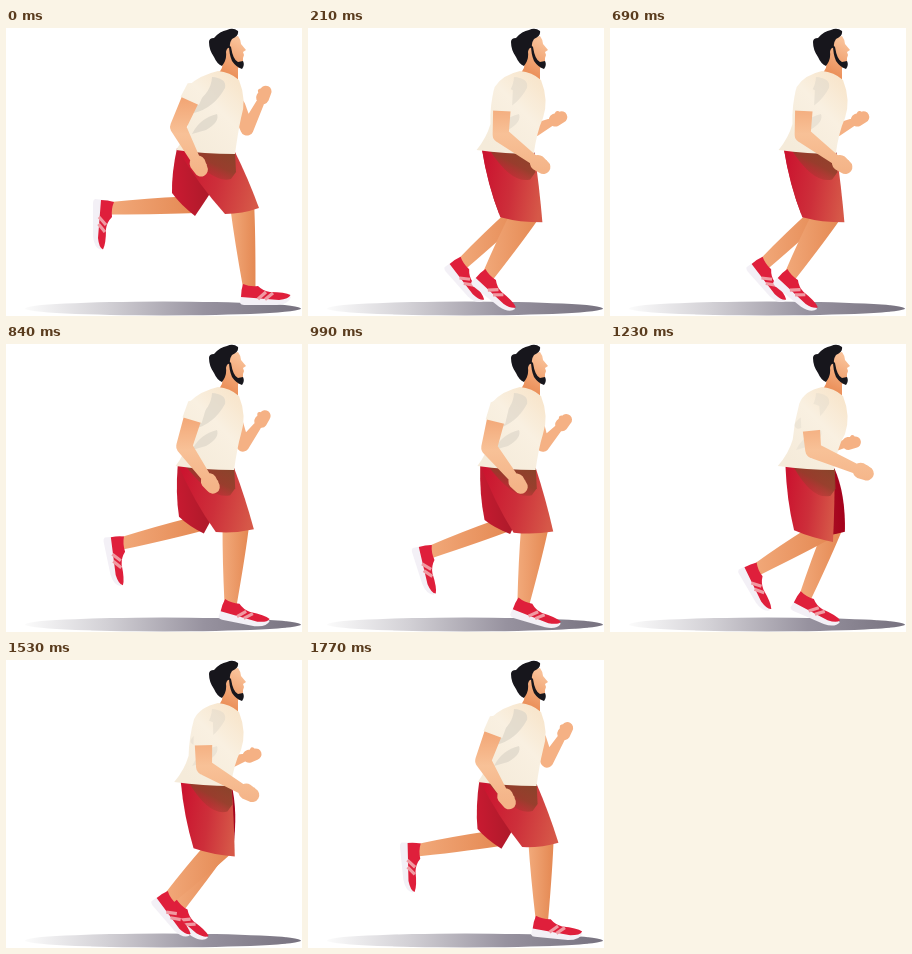
An HTML page for the animation above (1.8 s loop, 296x288 px).

```html
<!DOCTYPE html>
<html lang="en">
<head>
<meta charset="utf-8">
<title>Runner</title>
<style>
  html, body { margin: 0; width: 100%; height: 100%; overflow: hidden; background: #fff; }
  svg { display: block; width: 100vw; height: 100vh; }
</style>
</head>
<body>
<svg viewBox="0 0 296 288" xmlns="http://www.w3.org/2000/svg">
  <defs>
    <linearGradient id="ground">
      <stop offset="0" stop-color="#fbfbfb"/><stop offset=".3" stop-color="#d2d0d5"/>
      <stop offset=".65" stop-color="#97929f"/><stop offset="1" stop-color="#77727f"/>
    </linearGradient>
    <linearGradient id="shirt" gradientUnits="userSpaceOnUse" x1="180" y1="115" x2="236" y2="60">
      <stop offset="0" stop-color="#f5ebda"/><stop offset=".6" stop-color="#f9f0e1"/><stop offset="1" stop-color="#f8e6cd"/>
    </linearGradient>
    <linearGradient id="nearRed" x1="0" y1=".4" x2="1" y2=".6">
      <stop offset="0" stop-color="#cb142f"/><stop offset=".5" stop-color="#cd2f3a"/><stop offset="1" stop-color="#d65848"/>
    </linearGradient>
    <linearGradient id="brown" x1="1" y1="0" x2=".2" y2="1">
      <stop offset="0" stop-color="#86452a"/><stop offset=".5" stop-color="#8f3f2a" stop-opacity=".85"/>
      <stop offset="1" stop-color="#b02a30" stop-opacity="0"/>
    </linearGradient>
    <linearGradient id="farRed" gradientUnits="userSpaceOnUse" x1="170" y1="165" x2="235" y2="160">
      <stop offset="0" stop-color="#c81a31"/><stop offset=".5" stop-color="#ae1a2a"/><stop offset="1" stop-color="#a4001b"/>
    </linearGradient>
    <linearGradient id="leg">
      <stop offset="0" stop-color="#f2aa7b"/><stop offset="1" stop-color="#e48852"/>
    </linearGradient>
    <linearGradient id="arm" gradientUnits="userSpaceOnUse" x1="0" y1="70" x2="0" y2="142">
      <stop offset="0" stop-color="#f2a574"/><stop offset=".5" stop-color="#f8c197"/><stop offset="1" stop-color="#f4b488"/>
    </linearGradient>
    <linearGradient id="face" gradientUnits="userSpaceOnUse" x1="220" y1="48" x2="236" y2="14">
      <stop offset="0" stop-color="#ea8c55"/><stop offset="1" stop-color="#f9c198"/>
    </linearGradient>
    <g id="shoe">
      <path fill="#f3f0f6" d="M-8 7 L-9 16 Q-8 18 -5 18 L28 18 Q40 17 42 10 L38 8Z"/>
      <path fill="#df1f3b" d="M-6 -3 Q1 0 9 -1 Q14 4 21 5 Q36 5 41.500 8 Q40 12 30 13 L-8 10 Q-8 3 -6 -3Z"/>
      <path stroke="#f09aa2" stroke-width="3.200" fill="none" d="M9 12 L17 5 M16 12.500 L24 6"/>
    </g>
  </defs>
  <ellipse cx="157" cy="280.500" rx="138" ry="7" fill="url(#ground)"/>
  <path id="farArm" fill="#f5b184"/>
  <path id="farLeg" fill="url(#leg)"/>
  <use id="farShoe" href="#shoe"/>
  <path id="farPants" fill="url(#farRed)"/>
  <path id="nearLeg" fill="url(#leg)"/>
  <use id="nearShoe" href="#shoe"/>
  <path id="nearPants" fill="url(#nearRed)"/>
  <path id="shade" fill="url(#brown)"/>
  <path fill="url(#face)" d="M221 11 L232 8 Q235 12 235 16 L240 22 L237 24 L238 27 L237 30 L237 36 L232 40 L232 52 L211 46 Q218 42 217 28Z"/>
  <path id="top" fill="url(#shirt)"/>
  <g id="folds" fill="#ddd6c9">
    <path d="M206 49 Q221 50 219 60 Q208 80 188 85 Q180 82 190 74 Q205 65 206 49Z"/>
    <path d="M186 106 Q194 90 211 86 Q214 94 200 102Z"/>
  </g>
  <path fill="#17161c" d="M203 14 Q203 10 208 10 Q214 3 221 2 Q227 -1 232 3 Q233 8 226 11 Q223 15 224 20 Q221 19 220 24 Q221 32 216 38 Q211 36 208 29 Q203 22 203 14Z"/>
  <path fill="#17161c" d="M223 17 L225 19 Q227 32 232 34 L237 33 Q239 37 236 41 Q230 39 226 33 Q223 26 223 17Z"/>
  <path id="nearArm" fill="url(#arm)"/>
  <path id="sleeve" fill="url(#shirt)"/>
</svg>
<script>
const FRAME = 30, HALF = 450;

const $ = id => document.getElementById(id);
const mix = (a, b, k) => a.map((v, i) => v + (b[i] - v) * k);
const add = (p, d, k = 1) => [p[0] + d[0] * k, p[1] + d[1] * k];
const at = p => p.map(v => v.toFixed(2)).join(" ");
const draw = (id, d) => $(id).setAttribute("d", d);
const side = d => [-d[1], d[0]];

function unit(a, b) {
  const x = b[0] - a[0], y = b[1] - a[1], n = Math.hypot(x, y) || 1;
  return [x / n, y / n];
}

// Parabola through three points, reaching the middle one at k = .5
const arc = (a, b, c) => k =>
  a.map((v, i) => v * (2 * k - 1) * (k - 1) + b[i] * 4 * k * (1 - k) + c[i] * k * (2 * k - 1));

// Paths run from near leg forward to near leg back
const LEGS = {
  near: {
    hemBack: arc([219, 186], [191, 189], [181, 180]),
    hemFront: arc([253, 180], [233, 195], [211, 198]),
    ankle: arc([243, 259], [176, 245], [116, 192]),
    turn: arc([0], [41], [80])
  },
  far: {
    hemBack: arc([166, 165], [193, 187], [222, 191]),
    hemFront: arc([189, 188], [221, 190], [250, 183]),
    ankle: arc([105, 180], [159, 238], [245, 259]),
    turn: arc([90], [45], [-2])
  }
};
const ARMS = {
  near: {
    shoulder: arc([185, 70], [195, 74], [207, 75]),
    elbow: arc([172, 99], [194, 107], [213, 102]),
    hand: arc([193, 138], [235, 136], [273, 113]),
    size: 1
  },
  far: {
    shoulder: arc([232, 78], [224, 82], [217, 82]),
    elbow: arc([241, 101], [226, 102], [212, 104]),
    hand: arc([258, 67], [249, 92], [230, 103]),
    size: .82
  }
};

// Round-ended limb segment
function taper(a, b, ra, rb) {
  const n = side(unit(a, b));
  return `M${at(add(a, n, ra))}A${ra} ${ra} 0 0 1 ${at(add(a, n, -ra))}` +
    `L${at(add(b, n, -rb))}A${rb} ${rb} 0 0 1 ${at(add(b, n, rb))}Z`;
}

function arm(name, k) {
  const { shoulder, elbow, hand, size } = ARMS[name];
  const s = shoulder(k), e = elbow(k), h = hand(k), d = unit(e, h);
  const palm = add(h, d, -3);
  draw(name + "Arm", taper(s, e, 9 * size, 8 * size) +
    taper(e, add(h, d, -9), 8 * size, 5 * size) +
    taper(palm, add(h, d, 4), 8 * size, 7 * size) +
    taper(palm, add(add(h, d, 2), side(d), -5), 3, 2.5));
}

function leg(name, k, back, front, bulge) {
  const part = LEGS[name];
  const a = part.hemBack(k), b = part.hemFront(k), ankle = part.ankle(k);
  const d = unit(mix(a, b, .5), ankle), n = side(d);
  const p = add(mix(a, b, .17), d, -5), q = add(mix(a, b, .87), d, -5);
  const pa = add(ankle, n, 6), qa = add(ankle, n, -6.5);
  draw(name + "Leg", `M${at(p)}Q${at(add(mix(p, pa, .45), n, 1))} ${at(pa)}` +
    `L${at(add(pa, d, 4))}L${at(add(qa, d, 4))}L${at(qa)}Q${at(add(mix(q, qa, .35), n, -1))} ${at(q)}Z`);
  $(name + "Shoe").setAttribute("transform", `translate(${at(ankle)}) rotate(${at(part.turn(k))})`);
  draw(name + "Pants", `M${at(back)}Q${at(add(mix(back, a, .5), [-3, 3]))} ${at(a)}` +
    `Q${at(add(mix(a, b, .5), d, 3))} ${at(b)}Q${at(add(mix(b, front, .5), bulge))} ${at(front)}Z`);
}

function shirt(k) {
  const shoulder = mix([182, 58], [192, 60], k), waist = mix([182, 97], [183, 95], k);
  const hem = mix([170, 122], [167, 122], k), tail = mix([229, 126], [222, 126], k);
  draw("top", `M212 43Q194 47 ${at(shoulder)}Q${at(add(shoulder, [-5, 18]))} ${at(waist)}` +
    `Q${at(add(waist, [-4, 14]))} ${at(hem)}Q198 126 ${at(tail)}` +
    `Q${at(add(tail, [3, -22]))} 235 90Q241 72 233 52Q224 44 212 43Z`);
  $("folds").setAttribute("opacity", .75 - .55 * k);

  const s = ARMS.near.shoulder(k), e = ARMS.near.elbow(k), d = unit(s, e), n = side(d);
  const cuff = mix(s, e, .1 + .38 * k), cap = add(s, d, -12);
  draw("sleeve", `M${at(add(cuff, n, 10))}L${at(add(cuff, n, -10))}` +
    `L${at(add(cap, n, -10))}Q${at(add(cap, d, -6))} ${at(add(cap, n, 9))}Z`);
}

function render(k) {
  const back = mix([171, 120], [177, 121], k), front = mix([229, 124], [223, 125], k);
  leg("far", k, back, front, [6, -6]);
  leg("near", k, back, front, [1, -2]);
  draw("shade", `M${at(add(back, [8, 2]))}L${at(front)}L${at(add(front, [1, 20]))}` +
    `L${at(add(front, [-4, 27]))}Q${at(add(front, [-22, 32]))} ${at(add(back, [8, 2]))}Z`);
  shirt(k);
  arm("near", k);
  arm("far", k);
}

const start = performance.now();
function tick() {
  const t = Math.floor((performance.now() - start) / FRAME) * FRAME % (2 * HALF);
  render(1 - Math.abs(t / HALF - 1) || 0);
  requestAnimationFrame(tick);
}
tick();
</script>
</body>
</html>
```
